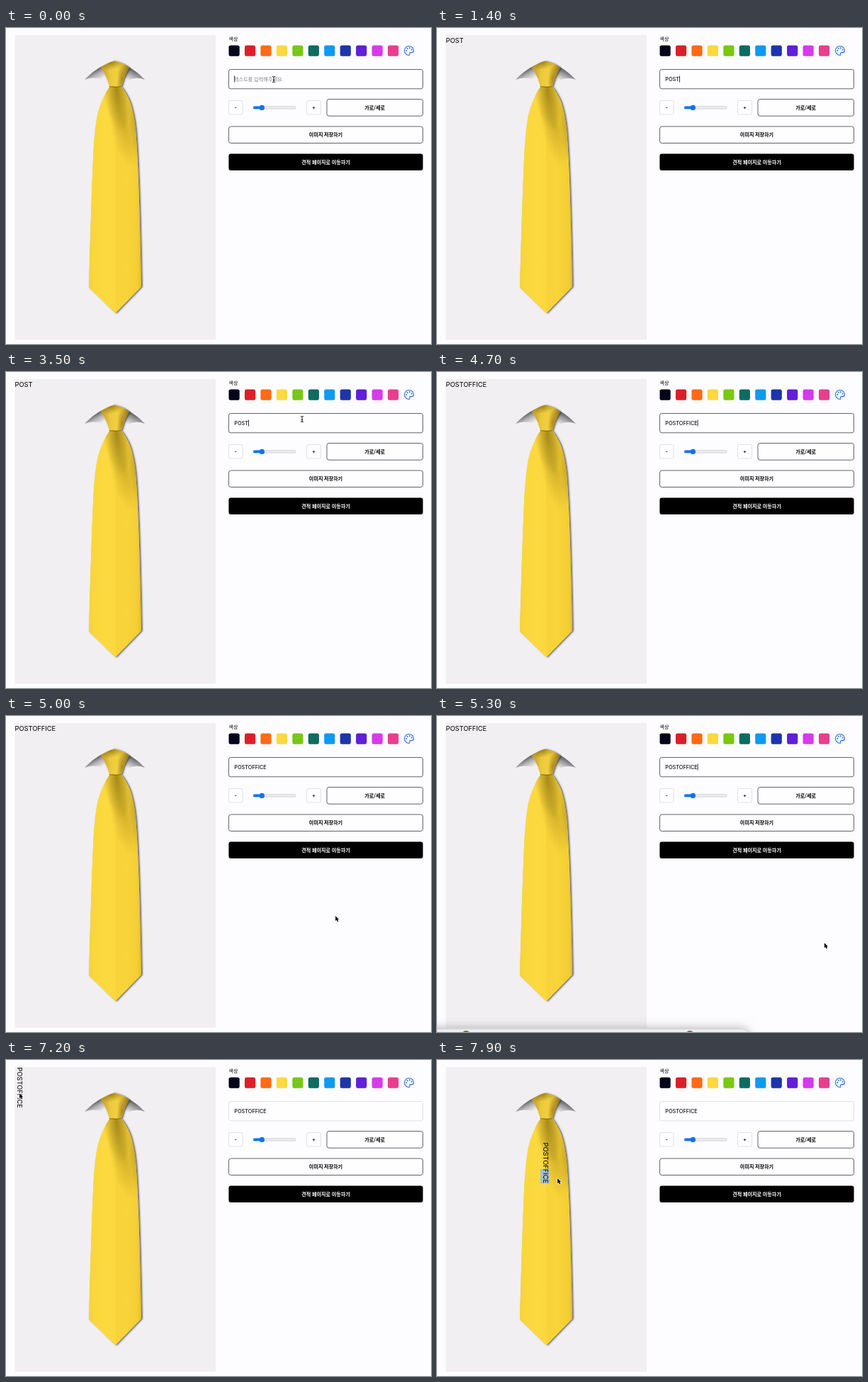
These frames come from a looping animation (600x446 px, 8 s). An HTML page with a canvas:

```html
<!DOCTYPE html>
<html lang="ko">
<head>
<meta charset="utf-8">
<title>Tie editor</title>
<style>
html, body { margin: 0; width: 100%; height: 100%; overflow: hidden; background: #fdfcfe; }
canvas { display: block; width: 600px; height: 446px; }
</style>
</head>
<body>
<canvas id="stage"></canvas>
<script>
const W = 600, H = 446, LOOP = 8000;
const KR = '"Noto Sans CJK KR", "Noto Sans CJK", sans-serif';
const LATIN = 'Inter, sans-serif';
const WORD = 'POSTOFFICE';
const KEY_TIMES = [690, 890, 1090, 1290, 3790, 3890, 3990, 4090, 4190, 4290];
const BLUR_AT = 5690, TURN_AT = 5720, GRAB_AT = 7400, SELECT_AT = 7450, LAG = 58;
const SWATCHES = ['#04041a', '#da2027', '#ff6a14', '#fdd93b', '#78c814', '#0e6b60',
  '#1199ec', '#1c35a8', '#5f20d6', '#d63aec', '#e83f8d'];
// time, x, y of the pointer hotspot
const POINTER = [
  [0, 378, 72.5], [3000, 378, 72.5], [3450, 418, 66.5], [4800, 418, 66.5],
  [5150, 500, 442], [5300, 547, 321], [5550, 523, 116], [5800, 523, 116],
  [6100, 251, 136.5], [6300, 45, 62], [6500, 45, 62], [7000, 19, 47],
  [GRAB_AT, 19, 47], [7900, 170, 167], [8000, 180, 174]
];

const canvas = document.getElementById('stage');
const dpr = window.devicePixelRatio || 1;
const ctx = canvas.getContext('2d');
canvas.width = W * dpr;
canvas.height = H * dpr;

const clamp = v => Math.max(0, Math.min(1, v));
const ramp = (t, a, b) => clamp((t - a) / (b - a));

function pointerAt(t) {
  let i = 1;
  while (i < POINTER.length - 1 && POINTER[i][0] < t) i++;
  const [t0, x0, y0] = POINTER[i - 1], [t1, x1, y1] = POINTER[i];
  const k = ramp(t, t0, t1);
  return { x: x0 + (x1 - x0) * k, y: y0 + (y1 - y0) * k };
}

function box(c, x, y, w, h, r, fill, stroke) {
  c.beginPath();
  c.roundRect(x, y, w, h, r);
  if (fill) { c.fillStyle = fill; c.fill(); }
  if (stroke) { c.strokeStyle = stroke; c.lineWidth = .65; c.stroke(); }
}

function label(c, text, x, y, font, color = '#000', align = 'left') {
  c.font = font;
  c.fillStyle = color;
  c.textAlign = align;
  c.textBaseline = 'alphabetic';
  c.fillText(text, x, y);
}

function disc(c, x, y, r, color) {
  c.fillStyle = color;
  c.beginPath();
  c.arc(x, y, r, 0, Math.PI * 2);
  c.fill();
}

function linear(c, x0, y0, x1, y1, stops) {
  const g = c.createLinearGradient(x0, y0, x1, y1);
  stops.forEach(([at, color]) => g.addColorStop(at, color));
  return g;
}

// soft elliptical tint
function glow(c, x, y, rx, ry, turn, rgb, alpha) {
  c.save();
  c.translate(x, y);
  c.rotate(turn);
  c.scale(rx, ry);
  const g = c.createRadialGradient(0, 0, 0, 0, 0, 1);
  g.addColorStop(0, `rgba(${rgb},${alpha})`);
  g.addColorStop(.5, `rgba(${rgb},${alpha * .5})`);
  g.addColorStop(1, `rgba(${rgb},0)`);
  c.fillStyle = g;
  c.fillRect(-1, -1, 2, 2);
  c.restore();
}

const COLLAR_LEFT = new Path2D('M111 73Q122 61 137 53L146 79Q132 66 111 73Z');
const COLLAR_RIGHT = new Path2D('M170 53Q185 61 196 73Q178 66 163 81Z');
const KNOT = new Path2D('M134 55.500Q143 49 153 46.500Q165 49 174 56Q167 67 163 82.500L146 82.500Q142 67 134 55.500Z');
const BLADE = new Path2D('M146 83L163 83Q170 92 175 104Q181 121 183.200 145Q188 205 191 365L154.500 402.500L117 366Q120 255 123 185Q125 135 131.500 114Q137.500 96 146 83Z');

function drawTie(c) {
  c.fillStyle = linear(c, 126, 58.5, 134, 73, [[0, '#5a5a5c'], [.4, '#adacae'], [1, '#f1eff2']]);
  c.fill(COLLAR_LEFT);
  c.fillStyle = linear(c, 182, 59, 174, 75, [[0, '#5a5a5c'], [.45, '#a5a4a6'], [1, '#f1eff2']]);
  c.fill(COLLAR_RIGHT);

  c.save();
  c.shadowColor = 'rgba(50,45,40,.75)';
  c.shadowBlur = 2.5 * dpr;
  c.shadowOffsetX = 1.8 * dpr;
  c.shadowOffsetY = .6 * dpr;
  c.fillStyle = '#f8d63b';
  c.fill(BLADE);
  c.fill(KNOT);
  c.restore();

  c.save();
  c.clip(BLADE);
  c.fillStyle = linear(c, 117, 0, 192, 0, [[0, '#f5d139'], [.06, '#f9d63c'], [.3, '#fcda3f'],
    [.49, '#fbd83d'], [.51, '#f7d33a'], [.7, '#f9d53a'], [.93, '#f3cd35'], [1, '#dab32b']]);
  c.fillRect(110, 80, 90, 330);
  glow(c, 156, 88, 19, 58, -.12, '95,72,0', .5);
  glow(c, 166, 136, 19, 62, -.2, '120,88,0', .3);
  glow(c, 182, 130, 9, 65, -.1, '120,88,0', .3);
  c.restore();

  c.save();
  c.clip(KNOT);
  c.fillStyle = linear(c, 136, 0, 173, 0, [[0, '#c29e2f'], [.3, '#ecc93b'], [.55, '#f2cf3d'],
    [.8, '#d8b233'], [1, '#8f731f']]);
  c.fillRect(130, 44, 50, 42);
  glow(c, 148, 47, 20, 12, -.2, '60,46,0', .5);
  glow(c, 164, 72, 7, 22, .15, '80,60,0', .35);
  c.restore();

  c.strokeStyle = '#7d6414';
  c.lineWidth = .9;
  c.beginPath();
  c.moveTo(146, 82.7);
  c.quadraticCurveTo(155, 84, 163, 82.7);
  c.stroke();
}

function drawPalette(c) {
  const blue = '#1b72d8';
  c.save();
  c.translate(561.2, 24.2);
  c.scale(.65, .65);
  c.strokeStyle = blue;
  c.lineWidth = 1.7;
  c.stroke(new Path2D('M12 22a10 10 0 1 1 10-10c0 3-2 4-4.500 4H15c-2 0-2.500 1.500-1.800 3 .6 1.400.2 3-1.200 3z'));
  [[6.5, 12], [8.5, 7.5], [13.5, 6.2], [17.5, 10]].forEach(([x, y]) => disc(c, x, y, 1.5, blue));
  c.restore();
}

function drawPage(c) {
  c.fillStyle = '#fdfcfe';
  c.fillRect(0, 0, W, H);
  c.fillStyle = '#f1eff2';
  c.fillRect(12.5, 10, 283.5, 430);
  drawTie(c);

  label(c, '색상', 314.5, 18, `500 7px ${KR}`);
  SWATCHES.forEach((color, i) => box(c, 314.5 + i * 22.45, 24.5, 15.2, 15.2, 2.8, color));
  drawPalette(c);

  box(c, 314.5, 102.5, 19.5, 19.5, 1.5, '#fefdff', '#d2d1d6');
  box(c, 424.5, 102.5, 20, 19.5, 1.5, '#fefdff', '#d2d1d6');
  label(c, '-', 324.2, 114.8, `500 7.5px ${LATIN}`, '#000', 'center');
  label(c, '+', 434.5, 114.8, `500 7.5px ${LATIN}`, '#000', 'center');

  box(c, 349.2, 110.7, 60, 3.4, 1.7, '#efeef0', '#bfbec2');
  box(c, 349, 110.5, 13, 3.8, 1.9, '#0b74f5');
  disc(c, 361.3, 112.4, 3.7, '#0b74f5');

  box(c, 314.5, 139, 274, 23.5, 3, '#fefdff', '#111');
  label(c, '이미지 저장하기', 451.5, 153.3, `bold 7.1px ${KR}`, '#000', 'center');
  box(c, 314.4, 177.5, 274.2, 23.6, 3, '#000');
  label(c, '견적 페이지로 이동하기', 451.5, 192, `bold 7.1px ${KR}`, '#fff', 'center');
}

function drawInput(c, t, typed) {
  const focused = t < BLUR_AT;
  box(c, 314.5, 58.5, 274, 27.3, 2.8, '#fefdff', focused ? '#111' : '#d2d1d6');
  const font = `500 7.3px ${LATIN}`;
  if (typed) label(c, typed, 322.3, 74.8, font, '#111');
  else label(c, '텍스트를 입력해주세요.', 322, 74.8, `7.2px ${KR}`, '#85848a');

  const lastKey = typed ? KEY_TIMES[typed.length - 1] : -310;
  if (focused && (t - lastKey) % 1000 < 500) {
    c.font = font;
    c.fillStyle = '#000';
    c.fillRect(322.3 + c.measureText(typed).width, 67.5, .8, 9);
  }
}

function drawToggle(c, t) {
  const hover = ramp(t, 5500, 5650) * (1 - ramp(t, 5900, 6300));
  c.save();
  c.globalAlpha = 1 - .5 * hover;
  box(c, 453, 100.5, 135.5, 23.7, 3, '#fefdff', '#111');
  label(c, '가로/세로', 520.7, 114.8, `bold 7.1px ${KR}`, '#000', 'center');
  c.restore();
}

function drawOverlayText(c, t, typed) {
  const font = `9.3px ${LATIN}`;
  if (t < TURN_AT) return label(c, typed, 12.5, 20.5, font);
  const p = pointerAt(Math.max(GRAB_AT, t - LAG));
  const held = t > GRAB_AT;
  c.save();
  c.translate(16 + (held ? p.x - 19 : 0), 10.2 + (held ? p.y - 47 : 0));
  c.rotate(Math.PI / 2);
  if (t >= SELECT_AT) {
    c.font = font;
    const from = c.measureText('POSTOF').width;
    c.fillStyle = '#a3bfd0';
    c.fillRect(from, -9.2, c.measureText(WORD).width - from, 13);
  }
  label(c, typed, 0, 0, font);
  c.restore();
}

function drawDock(c, t) {
  const up = ramp(t, 5190, 5300) * (1 - ramp(t, 5320, 5460));
  if (!up) return;
  const top = 447 - 4.8 * up;
  c.save();
  c.shadowColor = `rgba(0,0,0,${.36 * up})`;
  c.shadowBlur = 15 * dpr;
  box(c, -20, top, 459, 40, 9, '#efeeee');
  c.restore();
  disc(c, 41, top + 7.8, 6, '#6e6558');
  disc(c, 357, top + 7.8, 6, '#756a56');
}

const ARROW = new Path2D('M0 0V7.200L1.700 5.700L2.900 8.400L4.200 7.800L3 5.200H5.200Z');
const BEAM = new Path2D('M-2-4Q0-4 0-3Q0-4 2-4M0-3V3M-2 4Q0 4 0 3Q0 4 2 4M-1 1H1');

function drawPointer(c, t) {
  const hidden = (t >= KEY_TIMES[0] && t < 3000) || (t >= KEY_TIMES[4] && t < 4820);
  if (hidden) return;
  const { x, y } = pointerAt(t);
  c.save();
  c.translate(x, y);
  if (x > 314 && x < 589 && y > 58 && y < 86) {
    c.strokeStyle = 'rgba(255,255,255,.8)';
    c.lineWidth = 2;
    c.stroke(BEAM);
    c.strokeStyle = '#111';
    c.lineWidth = 1;
    c.stroke(BEAM);
  } else {
    c.strokeStyle = '#fff';
    c.lineWidth = 1.4;
    c.lineJoin = 'round';
    c.stroke(ARROW);
    c.fillStyle = '#000';
    c.fill(ARROW);
  }
  c.restore();
}

function render(now) {
  const t = now % LOOP;
  const typed = WORD.slice(0, KEY_TIMES.filter(k => k <= t).length);
  ctx.setTransform(dpr, 0, 0, dpr, 0, 0);
  drawPage(ctx);
  drawInput(ctx, t, typed);
  drawToggle(ctx, t);
  drawOverlayText(ctx, t, typed);
  drawDock(ctx, t);
  drawPointer(ctx, t);
}

const start = performance.now();
function tick() {
  render(performance.now() - start);
  requestAnimationFrame(tick);
}
tick();
</script>
</body>
</html>
```
